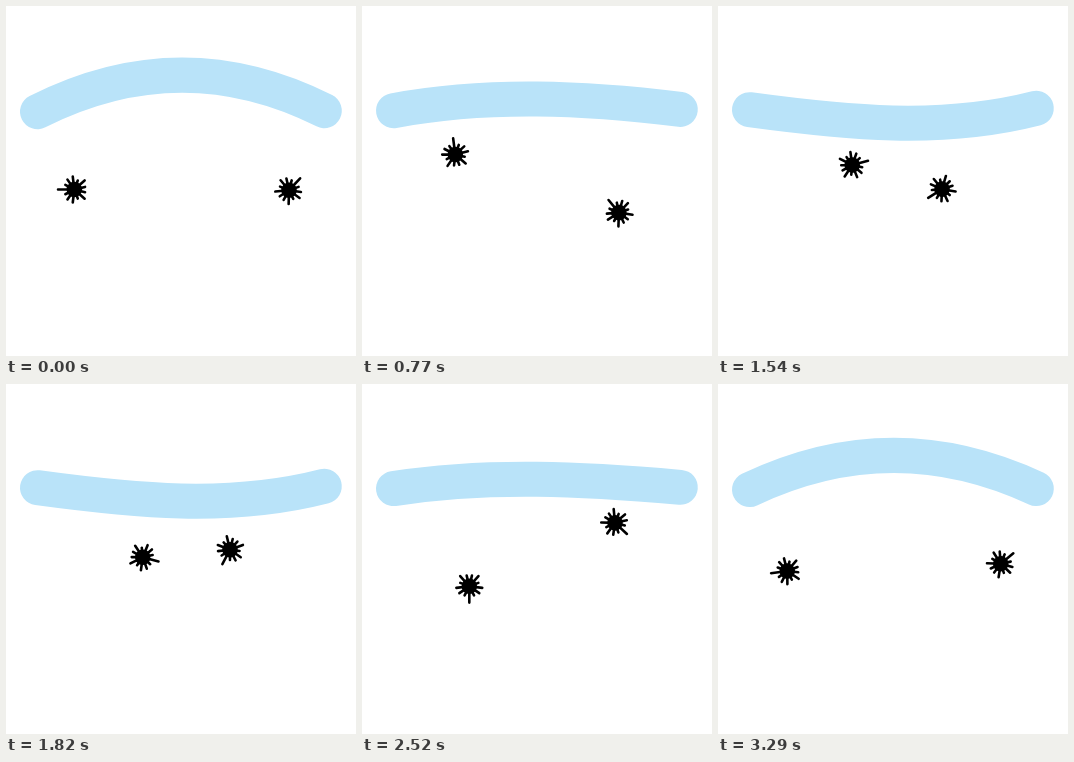
Animation of 350 by 350 pixels, one loop 3.36 s. Source, as an HTML page:

```html
<!DOCTYPE html>
<html lang="en">
<head>
<meta charset="utf-8">
<title>Brow and eyes</title>
<style>
  html, body { margin: 0; width: 100%; height: 100%; overflow: hidden; background: #fff; }
  svg { display: block; width: 100%; height: 100%; }
  #brow { fill: none; stroke: #b9e3f9; stroke-width: 35; stroke-linecap: round; }
  #spikes { stroke: #000; stroke-width: 2.6; stroke-linecap: round; }
</style>
</head>
<body>
<svg viewBox="0 0 350 350">
  <defs>
    <g id="eye"><circle r="7.8"/><path id="spikes"/></g>
  </defs>
  <path id="brow"/>
  <use id="left" href="#eye"/>
  <use id="right" href="#eye"/>
</svg>
<script>
  const STEP = 70, STEPS = 48, SPIKES = 13;
  const { PI, abs, cos, sin, floor } = Math;
  const byId = id => document.getElementById(id);
  const lerp = (a, b, t) => a + (b - a) * t;

  // Evenly spread spikes of uneven length; the first is the longest.
  function spikePath() {
    let d = '';
    for (let i = 0; i < SPIKES; i++) {
      const a = i * 2 * PI / SPIKES;
      const len = 11.8 + 2.2 * cos(5 * a) + (i ? 0 : 2.3);
      d += `M0 0L${len * cos(a)} ${len * sin(a)}`;
    }
    return d;
  }

  function place(id, x, y, turn) {
    byId(id).setAttribute('transform', `translate(${x} ${y}) rotate(${turn})`);
  }

  function draw(time) {
    const phase = floor(time / STEP) % STEPS / STEPS;
    const a = phase * 2 * PI, turn = phase * 360;

    place('left', 102.5 - 34.5 * cos(a - 0.14), 174.7 - 29 * sin(a - 0.31), 180 + turn);
    place('right', 253 + 30 * cos(a), 176 + 34 * sin(a + 0.14) + 3.5 * cos(2 * a), -47 - turn);

    // The brow sags steadily, then rises again.
    const sag = 1 - abs(1 - 2 * phase);
    const y1 = lerp(105.7, 103.5, sag), y2 = lerp(104.7, 102, sag);
    const c1 = lerp(57.5, 122, sag), c2 = lerp(57, 133, sag);
    byId('brow').setAttribute('d', `M31.5 ${y1}C127 ${c1} 223 ${c2} 318.3 ${y2}`);
  }

  byId('spikes').setAttribute('d', spikePath());
  const start = performance.now();
  function tick() {
    draw(performance.now() - start);
    requestAnimationFrame(tick);
  }
  tick();
</script>
</body>
</html>
```
